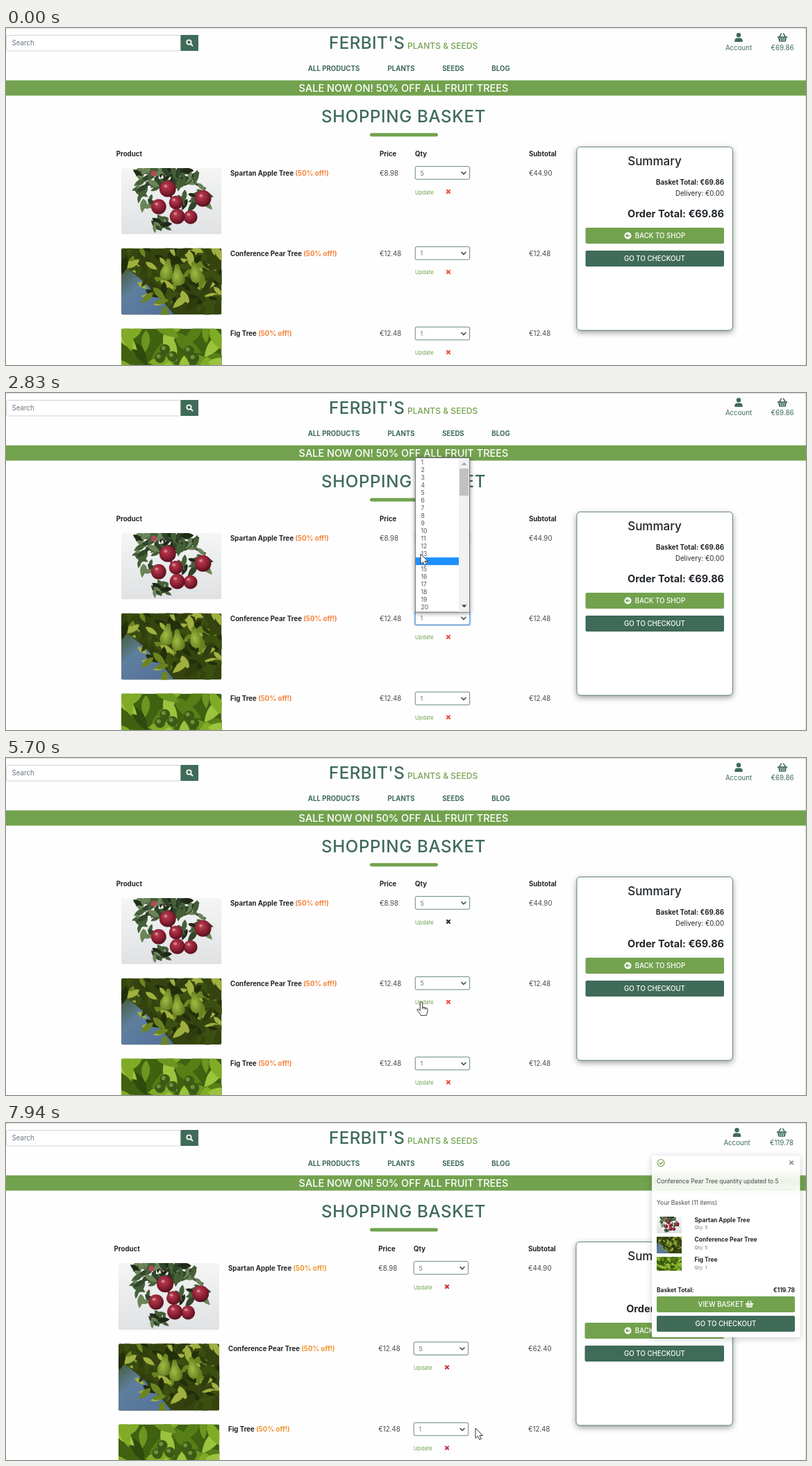
These frames come from a looping animation (1152 px wide and 486 px high, 8 s). An HTML page:

```html
<!DOCTYPE html>
<html lang="en">
<head>
<meta charset="utf-8">
<title>Shopping basket</title>
<style>
html, body { margin: 0; width: 100%; height: 100%; overflow: hidden; background: #fefefe; }
svg { display: block; width: 1152px; height: 486px; font-family: Inter, "Open Sans", sans-serif; }
text { white-space: pre; }
.card { filter: drop-shadow(0 3px 4px rgba(0,0,0,.38)); }
.toast { filter: drop-shadow(0 2px 5px rgba(0,0,0,.2)); }
.list { filter: drop-shadow(0 1px 3px rgba(0,0,0,.45)); }
</style>
</head>
<body>
<svg id="stage" viewBox="0 0 1152 486" xmlns="http://www.w3.org/2000/svg"></svg>
<script>
const LOOP = 8000, DARK = '#3f6b58', LIGHT = '#72a24e', INK = '#212529', GREY = '#454a4e';
const ROW_H = 11.05, LIST_TOP = 93.5;

// y is the middle of the capitals
const T = (x, y, s, { size = 9.7, w = 400, c = INK, a = 'start', ls = 0 } = {}) =>
  `<text x="${x}" y="${y + size * .36}" font-size="${size}" font-weight="${w}" fill="${c}" text-anchor="${a}" letter-spacing="${ls}">${s}</text>`;
const R = (x, y, w, h, fill, more = '') =>
  `<rect x="${x}" y="${y}" width="${w}" height="${h}" fill="${fill}" ${more}/>`;
const cross = (x, y, r, c, w, id = '') =>
  `<path ${id} d="M${x - r} ${y - r}l${2 * r} ${2 * r}m0 ${-2 * r}l${-2 * r} ${2 * r}" stroke="${c}" stroke-width="${w}"/>`;
const button = (x, y, w, fill, label) => R(x, y, w, 23, fill, 'rx="2"') + label;
const white = { c: '#fff', a: 'middle', w: 500, size: 9.7 };

const basketIcon = (x, y, c, k = 1) => `<g transform="translate(${x} ${y}) scale(${k})" fill="${c}">
  <path d="M-7-1.5H7V.7H-7zM-5.7 1.2H5.7L4.7 6H-4.7z"/>
  <path d="M-4.3-1L-1.5-5.5M4.3-1L1.5-5.5" stroke="${c}" stroke-width="1.6" stroke-linecap="round"/>
  <path d="M-2.5 2v3M0 2v3M2.5 2v3" stroke="${c === '#fff' ? LIGHT : '#fefefe'}"/></g>`;
const userIcon = x => `<circle cx="${x}" cy="10.3" r="3.2" fill="${DARK}"/>
  <path d="M${x - 5.7} 20v-1.6q0-4 4-4h3.4q4 0 4 4V20z" fill="${DARK}"/>`;

// --- pictures ---
function rng(s) { return () => (s = (s * 16807) % 2147483647) / 2147483647; }
function leaves(n, seed, x, y, w, h, size, cols) {
  const r = rng(seed * 7919);
  r();
  let out = '';
  for (let i = 0; i < n; i++) {
    const px = x + r() * w, py = y + r() * h, k = size * (.7 + r() * .6), turn = r() * 180;
    out += `<path transform="translate(${px.toFixed(1)} ${py.toFixed(1)}) rotate(${turn | 0}) scale(${k.toFixed(2)})"
      d="M-1 0Q-.2-.75 1 0Q-.2.75-1 0z" fill="${cols[r() * cols.length | 0]}"/>`;
  }
  return out;
}
const picture = (id, body) => `<symbol id="${id}" viewBox="0 0 145 96" preserveAspectRatio="none"><g clip-path="url(#round)">${body}</g></symbol>`;
const apple = (x, y, r) => `<circle cx="${x}" cy="${y}" r="${r}" fill="url(#red)"/>
  <ellipse cx="${x - 3}" cy="${y - 4}" rx="2.5" ry="2" fill="#e0a0a0" opacity=".7"/>`;
const pear = (x, y, turn) => `<path transform="translate(${x} ${y}) rotate(${turn})" fill="url(#pearSkin)"
  d="M-3-16Q0-19 3-16Q4-8 9 1Q12 13 0 14Q-12 13-9 1Q-4-8-3-16z"/>`;
const leafDark = ['#1f2a18', '#30452a', '#455f37', '#6b8558'];
const pearLeaf = ['#232f0a', '#3b4f10', '#6c8420', '#a0b040', '#2f3c0e'];
const figLeaf = ['#567f17', '#7fab26', '#9cc33e', '#2f4a0d', '#6b9620'];

const defs = `<defs>
<clipPath id="round"><rect width="145" height="96" rx="2.5"/></clipPath>
<radialGradient id="red" cx=".4" cy=".35" r=".7"><stop offset="0" stop-color="#bd4256"/><stop offset=".5" stop-color="#932236"/><stop offset="1" stop-color="#4c0e1b"/></radialGradient>
<radialGradient id="pearSkin" cx=".4" cy=".55" r=".6"><stop offset="0" stop-color="#a3bb45"/><stop offset="1" stop-color="#5d7a1c"/></radialGradient>
<linearGradient id="sky" x2="0" y2="1"><stop offset="0" stop-color="#f4f6f5"/><stop offset="1" stop-color="#dfe1e3"/></linearGradient>
<linearGradient id="blue" x2=".9" y2="1"><stop offset="0" stop-color="#41542a"/><stop offset=".4" stop-color="#5f7f9d"/><stop offset="1" stop-color="#526f9b"/></linearGradient>
<linearGradient id="haze" x2="0" y2="1"><stop offset="0" stop-color="#72a24e" stop-opacity="0"/><stop offset=".5" stop-color="#72a24e" stop-opacity=".14"/><stop offset="1" stop-color="#72a24e" stop-opacity="0"/></linearGradient>
<linearGradient id="foot" x2="0" y2="1"><stop offset="0" stop-color="#666" stop-opacity="0"/><stop offset="1" stop-color="#666" stop-opacity=".6"/></linearGradient>
${picture('apples', R(0, 0, 145, 96, 'url(#sky)') +
  '<path d="M20 8Q70 2 122 30M60 5Q70 40 78 55" fill="none" stroke="#463a30" stroke-width="3"/>' +
  leaves(60, 3, 24, 0, 84, 24, 9, leafDark) + leaves(18, 8, 20, 18, 34, 38, 9, leafDark) +
  leaves(24, 5, 74, 16, 50, 40, 9, leafDark) + leaves(14, 9, 42, 70, 26, 18, 8, leafDark) +
  '<circle cx="47" cy="8" r="4" fill="#b5485a"/>' +
  apple(100, 71, 10) + apple(67, 30, 12) + apple(118, 44, 12) + apple(54, 56, 11) + apple(79, 50, 10) + apple(81, 70, 11))}
${picture('pears', R(0, 0, 145, 96, '#35430f') + '<path d="M0 22Q45 55 76 96H0z" fill="url(#blue)"/>' +
  leaves(56, 4, 4, -4, 140, 40, 11, pearLeaf) + leaves(46, 11, 58, 34, 87, 62, 11, pearLeaf) +
  leaves(9, 6, 28, 46, 30, 40, 10, pearLeaf) + pear(66, 32, 8) + pear(82, 40, -6) + pear(108, 36, -14))}
${picture('figs', R(0, 0, 145, 96, '#3f6110') + leaves(60, 13, 0, 0, 145, 96, 18, figLeaf) +
  [[63, 30], [74, 40], [98, 32], [105, 43], [56, 42]].map(([x, y]) =>
    `<circle cx="${x}" cy="${y}" r="7.5" fill="#3b5a16"/><circle cx="${x - 2}" cy="${y - 2}" r="3" fill="#6e9136"/>`).join(''))}
</defs>`;
const pic = (id, x, y, w, h) => `<use href="#${id}" x="${x}" y="${y}" width="${w}" height="${h}"/>`;

// --- page parts ---
const header = R(0, 0, 1152, .8, '#d4d4d4') + R(1151, 0, 1, 486, '#dcdcdc') +
  R(.5, 10.5, 251, 22.5, '#fff', 'rx="2" stroke="#ced4da"') + T(8.5, 21.5, 'Search', { c: '#6c757d' }) +
  R(251.5, 10, 25.5, 23, DARK) +
  '<circle cx="263.5" cy="20.5" r="3.2" fill="none" stroke="#fff" stroke-width="1.7"/><path d="M266 23l3 3" stroke="#fff" stroke-width="2"/>' +
  T(465, 21.5, "FERBIT'S", { size: 24.2, w: 500, c: DARK, ls: .4 }) +
  T(578, 25.8, 'PLANTS &amp; SEEDS', { size: 12.1, w: 500, c: LIGHT }) +
  [[472, 'ALL PRODUCTS'], [569, 'PLANTS'], [644, 'SEEDS'], [712.5, 'BLOG']]
    .map(([x, s]) => T(x, 58.5, s, { w: 700, c: DARK, a: 'middle' })).join('') +
  R(0, 75.5, 1152, 22, LIGHT) +
  T(572.5, 86.5, 'SALE NOW ON! 50% OFF ALL FRUIT TREES', { size: 14.5, w: 500, c: '#fff', a: 'middle' }) +
  T(572.5, 127, 'SHOPPING BASKET', { size: 24.2, w: 500, c: DARK, a: 'middle', ls: .6 }) +
  R(524, 151.5, 98, 5, LIGHT, 'rx="2.5"');

const items = [['apples', 'Spartan Apple Tree', '€8.98'], ['pears', 'Conference Pear Tree', '€12.48'], ['figs', 'Fig Tree', '€12.48']];

function page(id, p) {
  const bold = { w: 700 };
  let s = `<g id="${id}">` + userIcon(p.acc) + T(p.acc, 29, 'Account', { c: DARK, a: 'middle' }) +
    basketIcon(p.bas, 13.7, DARK) + T(p.bas, 29, p.total, { c: DARK, a: 'middle' }) +
    T(p.left, 182, 'Product', bold) + T(p.price, 182, 'Price', bold) + T(p.qty, 182, 'Qty', bold) + T(p.sub, 182, 'Subtotal', bold);
  items.forEach(([img, name, price], i) => {
    const y = 209.3 + p.step * i, q = p.qty;
    s += pic(img, p.img, 202 + p.step * i, p.imgW, p.imgH) +
      T(p.name, y, `${name} <tspan fill="${p.orange}">(50% off!)</tspan>`, bold) +
      T(p.price, y, price, { c: GREY }) + T(p.sub, y, p.subs[i], { c: GREY }) +
      R(q - 1.5, y - 11.6, 82, 22.4, '#a9cdf5', `id="${id}ring${i}" rx="3.5" visibility="hidden"`) +
      R(q + .3, y - 9.7, 78.4, 18.6, '#fff', `id="${id}box${i}" rx="2" stroke="${DARK}" stroke-width=".8"`) +
      `<g id="${id}val${i}">` + T(q + 7.5, y, p.vals[i], { size: 9, c: '#6c757d' }) + '</g>' +
      `<path d="M${q + 66.5} ${y - 2}l3.5 3.5l3.5-3.5" fill="none" stroke="#343a40" stroke-width="1.4"/>` +
      T(q, y + 27.5, 'Update', { size: 7.8, c: LIGHT }) + cross(q + 48, y + 26.7, 2.7, p.red, 2, `id="${id}x${i}"`);
  });
  const cx = 934, end = { a: 'end', w: 700 };
  return s + R(p.card, 171.5, 1046.3 - p.card, 264.5, '#fff', `class="card" rx="5" stroke="${DARK}" stroke-width=".8"`) +
    T(cx, 191.5, 'Summary', { size: 17, w: 500, a: 'middle' }) +
    T(1034, 222.5, 'Basket Total: ' + p.total, end) + T(1034, 239, 'Delivery: €0.00', { a: 'end' }) +
    T(1034, 268, 'Order Total: ' + p.total, { ...end, size: 14.5 }) +
    button(p.card + 12.5, 288, 1021.5 - p.card, LIGHT, T(942, 299.5, 'BACK TO SHOP', white)) +
    `<circle cx="895.5" cy="299.5" r="5" fill="#fff"/><path d="M898.5 299.5h-5.5m2.3-2.3l-2.3 2.3l2.3 2.3" fill="none" stroke="${LIGHT}" stroke-width="1.4"/>` +
    button(p.card + 12.5, 321, 1021.5 - p.card, DARK, T(cx, 332.5, 'GO TO CHECKOUT', white)) + '</g>';
}
const before = { left: 158.7, img: 166, imgW: 144.5, imgH: 95.6, name: 323, price: 538, qty: 589, sub: 753, card: 822, acc: 1055, bas: 1118,
  step: 115.8, total: '€69.86', subs: ['€44.90', '€12.48', '€12.48'], vals: [5, 1, 1], orange: '#f5813a', red: '#ee4a3c' };
const after = { left: 155.5, img: 162, imgW: 145.2, imgH: 96.5, name: 320, price: 536.3, qty: 587, sub: 752, card: 821, acc: 1052.5, bas: 1117,
  step: 116.3, total: '€119.78', subs: ['€44.90', '€62.40', '€12.48'], vals: [5, 5, 1], orange: '#f0922e', red: '#c22f3c' };

const small = { size: 8.47 }, smallBold = { size: 8.47, w: 700 };
const toast = '<g id="toast">' + R(930, 47, 213.5, 262, '#fff', 'class="toast" rx="2"') + R(930, 66, 213.5, 38, 'url(#haze)') +
  `<circle cx="943" cy="57.5" r="5" fill="none" stroke="${LIGHT}" stroke-width="1.1"/><path d="M940.5 57.5l2 2l3.3-3.7" fill="none" stroke="${LIGHT}" stroke-width="1.3"/>` +
  cross(1131, 57.2, 2.7, '#858585', 1.5) +
  T(937, 83.5, 'Conference Pear Tree quantity updated to 5', { ...small, c: GREY }) + R(937, 95.5, 199, .7, '#dbe3d6') +
  T(937, 114.5, 'Your Basket (11 items)', { ...small, c: GREY }) +
  items.map(([img, name], i) => pic(img, 937, [135, 164, 193][i], 36, i < 2 ? 24 : 20) +
    T(991.5, 139.5 + 28.9 * i, name, smallBold) + T(991.5, 150.5 + 28.9 * i, 'Qty: ' + after.vals[i], { size: 6.7, c: '#6c757d' })).join('') +
  T(937, 241, 'Basket Total:', smallBold) + T(1136, 241, '€119.78', { ...smallBold, a: 'end' }) +
  button(937, 250, 199, LIGHT, T(1029.5, 261.5, 'VIEW BASKET', white)) + basketIcon(1070.5, 261.3, '#fff', .8) +
  button(937, 278, 199, DARK, T(1036.5, 289.7, 'GO TO CHECKOUT', white)) + '</g>';

const rowY = i => LIST_TOP + i * ROW_H;
let list = '<g id="list">' + R(589.5, 93.5, 78, 222.5, '#fff', 'class="list" stroke="#777"') + R(590, 0, 62, ROW_H, '#1e90ff', 'id="mark"');
for (let i = 0; i < 20; i++) list += `<g class="num">` + T(597.5, rowY(i) + 5.9, i + 1, { size: 8.7, c: 'currentColor' }) + '</g>';
list += R(652, 94, 15, 221.5, '#f1f1f1') + R(653, 109, 13, 39, '#c1c1c1') +
  '<path d="M656 104h7.5l-3.7-4z" fill="#a3a3a3"/><path d="M656 305.5h7.5l-3.7 4z" fill="#444"/></g>';
const ghost = '<g id="ghost">' + R(589, 92, 79, 224, '#fff', 'opacity=".1"') +
  '<path class="list" d="M589 93V316H668V93" fill="none" stroke="#999" stroke-opacity=".5"/>' + R(589, 311, 79, 5, 'url(#foot)') + '</g>';

const pointer = `<circle id="click" r="11.3" fill="#fbea2e" opacity=".68"/>
<path id="arrow" d="M0 0V14.6L3.4 11.5L5.8 16.6L8.3 15.5L6 10.5H10.4z" fill="#fff" stroke="#333"/>
<path id="hand" d="M-1.7 1.4a1.7 1.7 0 0 1 3.4 0V7.2l5.4 1.2q2.3.6 2.1 3l-.8 5-1.1 2.9h-7.8l-1-2.2-4.2-4.9q-1-1.6.4-2.2t3.6 2.4zM1.7 7.2v3M4.2 8v2.6M6.7 8.5v2.4" fill="#fff" stroke="#333"/>`;

document.getElementById('stage').innerHTML = defs + header + page('a', before) + page('b', after) + toast + ghost + list + pointer;

// --- motion ---
// time, x, y, sideways bow on the way there
const path = [[530, 1107, 479], [680, 1128, 476], [880, 1128, 476], [940, 1132, 474], [1620, 667, 268], [1690, 667, 268], [1960, 659, 323],
  [2550, 659, 323], [2830, 597, 232], [3290, 598, 150], [3360, 598, 150], [3420, 598, 144], [4280, 598, 144], [4900, 602, 347, 13],
  [5090, 602, 347], [5250, 598, 352], [6780, 598, 352], [7410, 704, 312], [7610, 704, 312], [7940, 676, 440]];
function at(t) {
  const i = path.findIndex(k => k[0] > t);
  if (i === 0) return path[0].slice(1);
  if (i < 0) return path[path.length - 1].slice(1);
  const [t0, x0, y0] = path[i - 1], [t1, x1, y1, bow = 0] = path[i];
  const k = (t - t0) / (t1 - t0), e = k * k * (3 - 2 * k);
  return [x0 + (x1 - x0) * e + bow * Math.sin(Math.PI * e), y0 + (y1 - y0) * e];
}
const $ = id => document.getElementById(id);
const show = (id, on) => $(id).setAttribute('visibility', on ? 'visible' : 'hidden');
const within = (t, a, b) => t >= a && t < b;
const nums = document.querySelectorAll('.num');
const pearVal = $('aval1').firstChild;

function draw(t) {
  const updated = t >= 6110, focus = within(t, 2150, 5600), hand = within(t, 4840, 6870);
  $('a').style.display = updated ? 'none' : '';
  $('b').style.display = updated ? '' : 'none';
  $('toast').setAttribute('opacity', t < 6110 ? 0 : t < 6190 ? .34 : t < 6260 ? .78 : 1);

  $('aring1').setAttribute('visibility', focus ? 'inherit' : 'hidden');
  $('abox1').setAttribute('stroke', focus ? '#447fb5' : DARK);
  pearVal.textContent = t < 4030 ? 1 : 5;
  $('ax0').setAttribute('stroke', t < 4030 ? before.red : '#2b2420');

  const open = within(t, 2150, 4030);
  $('ghost').style.display = within(t, 2080, 2150) ? '' : 'none';
  $('list').style.display = open ? '' : 'none';
  if (open) {
    const [lx, ly] = at(t - 60); // the marked row trails the pointer
    const row = lx < 652 ? Math.min(19, Math.floor((ly - LIST_TOP) / ROW_H)) : 0;
    $('mark').setAttribute('y', rowY(row));
    nums.forEach((n, i) => n.style.color = i === row ? '#fff' : '#4a5766');
  }

  const [x, y] = at(t), move = `translate(${x.toFixed(2)} ${y.toFixed(2)})`;
  ['click', 'arrow', 'hand'].forEach(id => $(id).setAttribute('transform', move));
  show('arrow', t >= 530 && !hand);
  show('hand', hand);
  show('click', within(t, 1960, 2150) || within(t, 3880, 4030) || within(t, 5560, 5700));
}
const start = performance.now();
function tick() {
  draw((performance.now() - start) % LOOP);
  requestAnimationFrame(tick);
}
tick();
</script>
</body>
</html>
```
